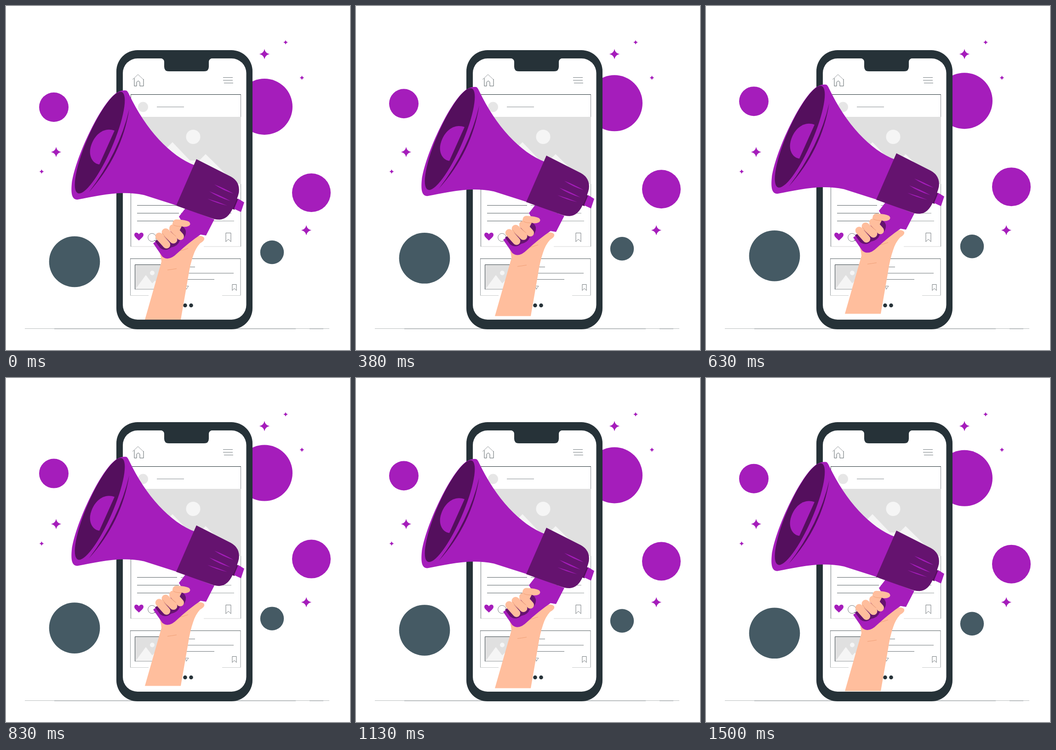
These frames come from a looping animation (748 by 748 pixels, 1.54 s). An HTML page with a canvas:

```html
<!DOCTYPE html>
<html lang="en">
<head>
<meta charset="utf-8">
<title>Megaphone</title>
<style>
html, body { margin: 0; width: 100%; height: 100%; overflow: hidden; background: #fff; }
canvas { display: block; width: 100vw; height: 100vh; }
</style>
</head>
<body>
<canvas id="stage" width="748" height="748"></canvas>
<script>
const ctx = document.getElementById('stage').getContext('2d');
const LOOP = 1540, STEPS = 37;
const PURPLE = '#a51dbb', PLUM = '#65136f', DEEP = '#540f5d', INK = '#263238',
      SLATE = '#455a64', SKIN = '#ffbe9d', CREASE = '#eb996e',
      GREY = '#e0e0e0', PALE = '#f5f5f5';

function fill(d, color) {
  ctx.fillStyle = color;
  ctx.fill(new Path2D(d));
}

function stroke(d, color = INK, width = 0.8, alpha = 1) {
  ctx.globalAlpha = alpha;
  ctx.strokeStyle = color;
  ctx.lineWidth = width;
  ctx.stroke(new Path2D(d));
  ctx.globalAlpha = 1;
}

function disc(x, y, r, color) {
  ctx.fillStyle = color;
  ctx.beginPath();
  ctx.arc(x, y, r, 0, 7);
  ctx.fill();
}

function box(x, y, w, h, r, color) {
  ctx.fillStyle = color;
  ctx.beginPath();
  ctx.roundRect(x, y, w, h, r);
  ctx.fill();
}

function star(x, y, r) {
  const k = r * 0.24;
  ctx.fillStyle = PURPLE;
  ctx.beginPath();
  ctx.moveTo(x, y - r);
  for (let i = 0; i < 4; i++) {
    const a = i * Math.PI / 2, c = a - Math.PI / 4;
    ctx.quadraticCurveTo(x + k * Math.cos(c), y + k * Math.sin(c),
                         x + r * Math.cos(a), y + r * Math.sin(a));
  }
  ctx.fill();
}

function bookmark(x, y, w, h) {
  stroke(`M${x} ${y}h${w}v${h}l${-w / 2} ${-w / 2}l${-w / 2} ${w / 2}z`, INK, 0.8, 0.8);
}

function lifted(dy, draw) {
  ctx.save();
  ctx.translate(0, dy);
  draw();
  ctx.restore();
}

function drawGround() {
  stroke('M41 701.5H703', INK, 0.8, 0.4);
  stroke('M105 702H630M660 702H690', INK, 0.8, 0.45);
}

function drawPost() {
  stroke('M271 192.5H510.5', INK, 1);
  stroke('M271.5 192V523', INK, 0.9, 0.75);
  stroke('M510.5 192V523', INK, 0.8, 0.65);
  stroke('M271 523H330M430 523H510', INK, 0.7, 0.3);
  disc(298, 219.5, 11, '#e6e6e6');
  stroke('M328 219.5H387', INK, 0.8, 0.7);

  box(271, 241, 240, 146, 0, GREY);
  disc(407, 284.5, 15.5, PALE);
  fill('M272 387L362 296L400 336L420 336L434 322L500 387Z', PALE);

  stroke('M285 433.5H372M285 450.5H376M285 467.5H381', INK, 0.9, 0.85);
  stroke('M380 433.5H490M380 450.5H490M381 467.5H496', INK, 0.8, 0.6);

  fill('M289 510C284 505 279 502 279 497.5C279 492 286 491 289 496.5' +
       'C292 491 299 492 299 497.5C299 502 294 505 289 510Z', PURPLE);
  stroke('M324 509A8.7 8.7 0 1 1 326 505L326.5 511L322 509.5', INK, 0.8, 0.8);
  stroke('M334 496H350L341 510L340 501Z', INK, 0.8, 0.7);
  bookmark(478, 493.5, 11, 19);
}

function drawSecondPost() {
  stroke('M270 549.5H510', INK, 0.9, 0.85);
  stroke('M270.5 549V629M510 549V629', INK, 0.8, 0.6);
  stroke('M270 629.5H310M470 629.5H510', INK, 0.7, 0.35);
  box(281, 563, 58, 53, 0, GREY);
  fill('M282 615L304 585L318 603L324 597L339 615Z', PALE);
  disc(318, 580.5, 5, PALE);
  stroke('M280.5 616V562.5H336', INK, 1, 0.9);
  stroke('M280 616H330', INK, 0.8, 0.5);
  stroke('M370 567.5H411M370 581H495M370 594.5H453', INK, 0.9, 0.75);
  stroke('M388 609H397L392 616L391 611Z', INK, 0.7, 0.8);
  bookmark(492, 605.5, 9, 13);
}

function drawPhone() {
  box(240, 96, 296, 607, 46, INK);
  box(254, 114, 268.5, 568, 32, '#fff');
  fill('M336 113.5Q344 114.5 344 122V132Q344 142 354 142H431Q441 142 441 132' +
       'V122Q441 114.5 449 113.5Z', INK);

  stroke('M275 160L287 149L299 160', INK, 0.8, 0.6);
  stroke('M279 157V174H284V166Q287.5 160 291 166V174H299V159', INK, 0.9, 0.85);
  stroke('M472 155.5H493M472 161.5H493M474 167.5H494', INK, 0.9, 0.7);

  drawPost();
  drawSecondPost();
  disc(389.5, 651, 4.3, INK);
  disc(402.5, 651, 4.3, INK);
}

function drawHorn() {
  fill('M262 184C249 182 239 188 228 200C195 236 150 335 143 386' +
       'C141 407 143 421 155 421C200 413 247 400 300 411L372 434L412 347' +
       'C356 326 304 268 268 193Q265 186 262 184Z', PURPLE);
  ctx.fillStyle = DEEP;
  ctx.beginPath();
  ctx.ellipse(204, 297, 120, 28, 113.5 * Math.PI / 180, 0, 7);
  ctx.fill();
  fill('M236 271C213 262 191 280 184 307C179 327 189 343 203 344.5Z', PURPLE);
  fill('M268 224Q252 325 180 405Q246 319 268 224Z', DEEP);
}

function drawArm() {
  fill('M302 682L338 556Q337 542 330 522L350 545L372 535L408 504Q424 496 431 504' +
       'Q433 510 422 516Q412 527 407 543Q400 563 396 590L380 682Z', SKIN);
  stroke('M351 574Q360 573 371 571M374 533Q386 531 396 527', CREASE, 0.8);
}

function drawHandle() {
  fill('M390 440L453 464L435 499L423 497Q398 514 372 538Q354 556 340 545' +
       'L320 516L384 472L376 458Z', PURPLE);
  fill('M324 511L335 526Q347 535 359 525Q374 522 378 510Q392 504 391 489' +
       'Q389 481 381 478Z', PLUM);
}

function drawCollar() {
  fill('M497 416L505 420L497 443L488 440Z', DEEP);
  fill('M505 419L518 427L511 448L496 441Z', PURPLE);
  fill('M414 333L489 371Q509 382 506.5 405Q504 418 493 440Q483 463 465 464.5' +
       'Q455 465 440 459L370 434Z', PLUM);
  for (const [x, y, w, h] of [[453, 388, 42, 20], [442, 403, 46, 21], [438, 419, 43, 15]]) {
    fill(`M${x} ${y}Q${x + w * 0.5} ${y + h * 0.4} ${x + w} ${y + h}` +
         `Q${x + w * 0.45} ${y + h * 0.65} ${x} ${y}Z`, PURPLE);
  }
}

function drawFingers() {
  ctx.lineCap = 'round';
  stroke('M333 501L349 519', SKIN, 16.5);
  stroke('M347 492L364 508', SKIN, 17);
  stroke('M363 483L379 501', SKIN, 16);
  fill('M362 473Q363 464 371 464Q391 465 398 469Q403 474 398 478Q390 482 382 479' +
       'L377 489L362 481Z', SKIN);
  ctx.lineCap = 'butt';
  stroke('M340 494Q346 503 355 510M355 486Q361 495 370 501M364 476Q371 480 382 479',
         CREASE, 0.8);
}

// Quick rise, then a slightly slower fall.
const lift = step => -Math.min(0.855 * step, 26.4 - 0.7 * step);

function frame(now) {
  const step = Math.floor((now % LOOP) / LOOP * STEPS + 0.1) % STEPS;
  const dy = lift(step);

  ctx.fillStyle = '#fff';
  ctx.fillRect(0, 0, 748, 748);
  drawGround();
  lifted(dy, () => disc(562, 219, 61, PURPLE));
  drawPhone();

  star(562, 104.5, 11);
  star(608, 79, 5);
  star(643.5, 156, 5);
  star(109, 317.5, 11);
  star(77.5, 360, 5);
  star(653, 487.5, 11);

  lifted(dy, () => {
    disc(104, 220, 32, PURPLE);
    disc(664, 406, 42, PURPLE);
    disc(149, 556, 55.3, SLATE);
    disc(578.5, 535.5, 25.7, SLATE);
    drawHorn();
    drawArm();
    drawHandle();
    drawCollar();
    drawFingers();
  });
  requestAnimationFrame(frame);
}

const start = performance.now();
requestAnimationFrame(now => frame(Math.max(0, now - start)));
</script>
</body>
</html>
```
